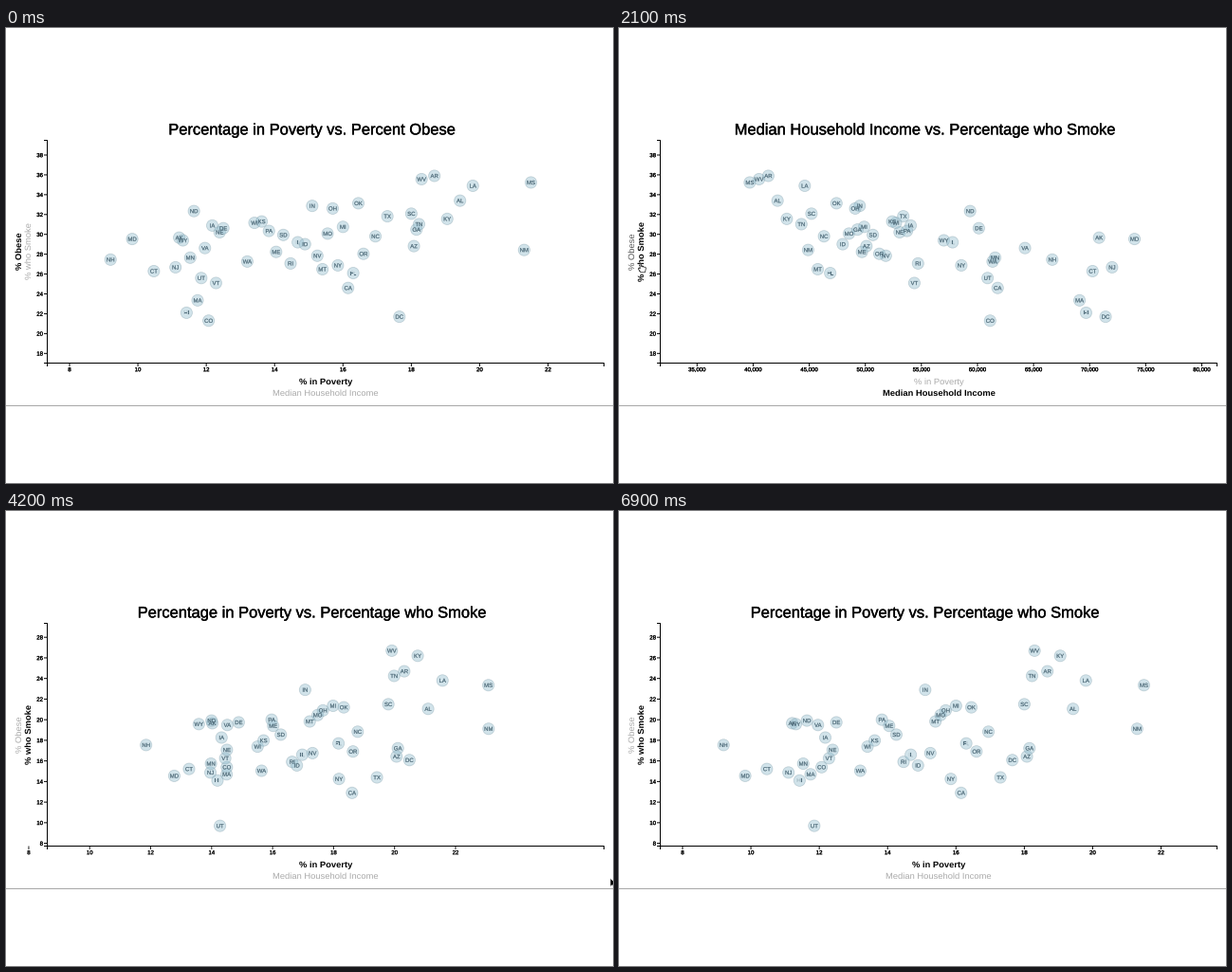
Recreate the animation shown at these times as a matplotlib script. Size 640 by 480 pixels, loop 7200 ms.

```python
from math import ceil

import matplotlib.pyplot as plt
import numpy as np
from matplotlib.animation import FuncAnimation
from matplotlib.patches import Circle, FancyBboxPatch, Polygon
from matplotlib.patheffects import withStroke

W, H, DPI = 640, 480, 100
PT = 72 / DPI  # points per pixel
FRAMES, STEP = 24, 300

plt.rcParams["font.family"] = "Liberation Sans"
plt.rcParams["text.hinting"] = "none"
plt.rcParams["toolbar"] = "None"


class Measure:
    """A quantity shown on one axis.

    States are ranked from low to high; a curve through a few (rank, value)
    points turns a rank into a value. Ticks run evenly from pixel p0 to p1.
    """

    def __init__(self, label, title, ticks, p0, p1, ranking, curve):
        self.label, self.title, self.ticks = label, title, ticks
        self.p0, self.p1 = p0, p1
        names = ranking.split()
        ranks, levels = zip(*curve)
        self.values = dict(zip(names, np.interp(range(len(names)), ranks, levels)))

    def to_px(self, v):
        first, last = self.ticks[0], self.ticks[-1]
        return self.p0 + (v - first) * (self.p1 - self.p0) / (last - first)

    def spot(self, state):
        return self.to_px(self.values[state])


poverty = Measure(
    "% in Poverty", "Percentage in Poverty", range(8, 23, 2), 67, 571.5,
    "NH MD CT NJ AK WY HI MN ND MA UT VA CO IA VT NE DE WA WI KS PA ME SD RI IL ID "
    "IN NV MT MO OH NY MI CA FL OK OR NC TX DC SC AZ GA TN WV AR KY AL LA NM MS",
    [(0, 9.2), (3, 11.1), (16, 12.5), (17, 13.2), (26, 15.1), (36, 16.6),
     (40, 18), (44, 18.3), (48, 19.8), (49, 21.3), (50, 21.5)])
income = Measure(
    "Median Household Income", "Median Household Income",
    range(35000, 80001, 5000), 82.3, 614.5,
    "MS WV AR AL KY TN LA NM SC MT NC FL OK ID MO OH GA IN ME MI AZ SD OR NV KS WI "
    "NE TX PA IA VT RI WY IL NY ND DE UT CO WA MN CA VA NH MA HI CT AK DC NJ MD",
    [(0, 39700), (4, 43000), (5, 44300), (8, 45200), (15, 49100), (20, 50100),
     (24, 52400), (31, 54700), (32, 57000), (37, 60900), (41, 61800),
     (44, 69100), (49, 72000), (50, 74000)])
obesity = Measure(
    "% Obese", "Percent Obese", range(18, 39, 2), 343.3, 134,
    "CO DC HI MA CA VT UT FL CT MT NJ NY RI WA NH MN NV OR ME NM VA AZ ID IL WY MD "
    "AK NC SD MO NE PA GA DE MI IA TN WI KS KY TX SC ND OH IN OK AL LA MS WV AR",
    [(0, 21.3), (2, 22.1), (4, 24.6), (7, 26.1), (24, 29.4), (38, 31.3),
     (46, 33.4), (47, 34.9), (50, 35.9)])
smokes = Measure(
    "% who Smoke", "Percentage who Smoke", range(8, 29, 2), 350.6, 133.2,
    "UT CA HI NY TX MD MA NJ WA CT CO ID MN RI DC VT AZ IL NV OR NE GA WI NH FL KS "
    "IA SD NC NM ME VA WY AK DE MT ND PA MO OH AL OK MI SC IN MS LA TN AR KY WV",
    [(0, 9.7), (1, 12.9), (2, 14.1), (6, 14.7), (17, 16.6), (24, 17.7),
     (30, 19.4), (37, 20), (39, 20.9), (43, 21.5), (44, 22.9), (48, 24.7),
     (49, 26.2), (50, 26.7)])

# Time in steps, measure switched off, measure switched on, pointer
TO_INCOME = (2, poverty, income, (338, 380))
TO_SMOKES = (6.98, obesity, smokes, (20, 248))
TO_POVERTY = (12.6, income, poverty, (333, 374))
CLICKS = (TO_INCOME, TO_SMOKES, TO_POVERTY)
MOVE = 2  # steps one transition takes

ARROW = {14: (637, 387), 16: (608, 262), 17: (547, 224), 18: (549, 226)}
TIP = (17, 18)

fig = plt.figure(figsize=(W / DPI, H / DPI), dpi=DPI, facecolor="white")
ax = fig.add_axes([0, 0, 1, 1])


def ease(u):
    u = min(max(u, 0), 1)
    return 4 * u ** 3 if u < 0.5 else 1 - (2 - 2 * u) ** 3 / 2


def mix(a, b, t):
    return a + (b - a) * t


def text(x, y, s, px, color="black", fat=0, **kw):
    """Write s on the baseline y; fat adds weight, in pixels."""
    effects = [withStroke(linewidth=fat * PT, foreground=color)] if fat else None
    ax.text(x, y, s, fontsize=px * PT, color=color, path_effects=effects,
            **{"ha": "center", "va": "baseline", **kw})


def line(xs, ys, color="black", alpha=1):
    ax.plot(xs, ys, color=color, lw=PT, alpha=alpha, solid_capstyle="butt",
            snap=False)


def moving_ticks(old, new, t):
    """Yield value, position and opacity of every tick at blend t."""
    for v in sorted(set(old.ticks) | set(new.ticks)):
        alpha = (1 - t) * (v in old.ticks) + t * (v in new.ticks)
        if alpha > 0.01:
            yield v, mix(old.to_px(v), new.to_px(v), t), alpha


def draw_axes(x_old, x_new, tx, y_old, y_new, ty):
    line([0, W], [398.5, 398.5], "#a8a8a8")
    line([40, 43.5, 43.5, 40], [118.5, 118.5, 353.5, 353.5])
    line([43.5, 43.5, 630.5, 630.5], [357, 353.5, 353.5, 357])
    for v, x, alpha in moving_ticks(x_old, x_new, tx):
        if -10 < x < W + 10:
            line([x, x], [353.5, 357], alpha=alpha)
            text(x, 362.2, f"{v:,}", 6, fat=0.25, alpha=alpha)
    for v, y, alpha in moving_ticks(y_old, y_new, ty):
        if 100 < y < 396:
            line([40, 43.5], [y, y], alpha=alpha)
            text(39, y + 2.2, str(v), 6, fat=0.25, ha="right", alpha=alpha)


def draw_dots(x_old, x_new, tx, y_old, y_new, ty):
    spots = [(mix(x_old.spot(s), x_new.spot(s), tx),
              mix(y_old.spot(s), y_new.spot(s), ty), s) for s in poverty.values]
    for x, y, _ in spots:
        ax.add_patch(Circle((x, y), 6.1, lw=0.8 * PT, zorder=3,
                            fc=(0.55, 0.73, 0.80, 0.4), ec=(0.52, 0.63, 0.68, 0.42)))
    for x, y, name in spots:
        text(x, y + 2.1, name, 6, "#54707e", 0.15, alpha=0.85, zorder=4)


def draw_labels(x_now, y_now, warm):
    text(322.5, 112.4, f"{x_now.title} vs. {y_now.title}", 16.5, fat=0.35, zorder=5)

    def style(m):
        if m in (x_now, y_now):
            return {"color": "black", "weight": "bold"}
        return {"color": "#555555" if m in warm else "#aaaaaa"}

    for m, y in ((poverty, 376.3), (income, 388.1)):
        text(337, y, m.label, 9.35, **style(m))
    for m, x in ((obesity, 17), (smokes, 27)):
        text(x, 235.5, m.label, 9.35, rotation=90, rotation_mode="anchor", **style(m))


def draw_tip():
    ax.add_patch(FancyBboxPatch((480.2, 233.2), 62.6, 33.6, lw=0, fc="#222222",
                                boxstyle="round,pad=2.2,rounding_size=2.5", zorder=6))
    rows = ("New Mexico", "Poverty (%): 21.3", "Smokers (%): 19.2")
    for i, row in enumerate(rows):
        text(511.3, 241.7 + 10.4 * i, row, 7.25, "white", zorder=7)


def shape(at, points, fc, ec):
    ax.add_patch(Polygon([(at[0] + x, at[1] + y) for x, y in points], fc=fc, ec=ec,
                         lw=0.8 * PT, joinstyle="round", zorder=8))


def draw_arrow(at):
    shape(at, [(0, 0), (0, 9.6), (2.2, 7.6), (3.8, 11), (5.3, 10.3), (3.8, 7),
               (6.8, 6.8)], "black", "white")


def draw_hand(at):
    shape(at, [(2, 0.5), (3.2, 0.5), (3.6, 3.6), (8, 4.4), (8.4, 5.6), (7.4, 9.8),
               (3, 9.8), (0.3, 6.2), (0.8, 5.2), (2.2, 6)], "white", "#333333")


def update(n):
    ax.clear()
    ax.set(xlim=(0, W), ylim=(H, 0))
    ax.axis("off")

    x_start, x_old, x_new, _ = TO_INCOME if n < TO_POVERTY[0] else TO_POVERTY
    y_start, y_old, y_new, _ = TO_SMOKES
    view = (x_old, x_new, ease((n - x_start) / MOVE),
            y_old, y_new, ease((n - y_start) / MOVE))
    draw_axes(*view)
    draw_dots(*view)

    # The pointer rests on a label for one step, then clicks it
    warm = []
    for start, off, on, at in CLICKS:
        wait = ceil(start) - n
        if wait in (0, 1):
            warm.append(on if wait else off)
            draw_hand(at)
    draw_labels(x_new if n >= x_start else x_old,
                y_new if n >= y_start else y_old, warm)

    if n in TIP:
        draw_tip()
    if n in ARROW:
        draw_arrow(ARROW[n])
    return []


anim = FuncAnimation(fig, update, frames=FRAMES, interval=STEP, repeat=True,
                     repeat_delay=0, blit=False)
plt.show()
```
